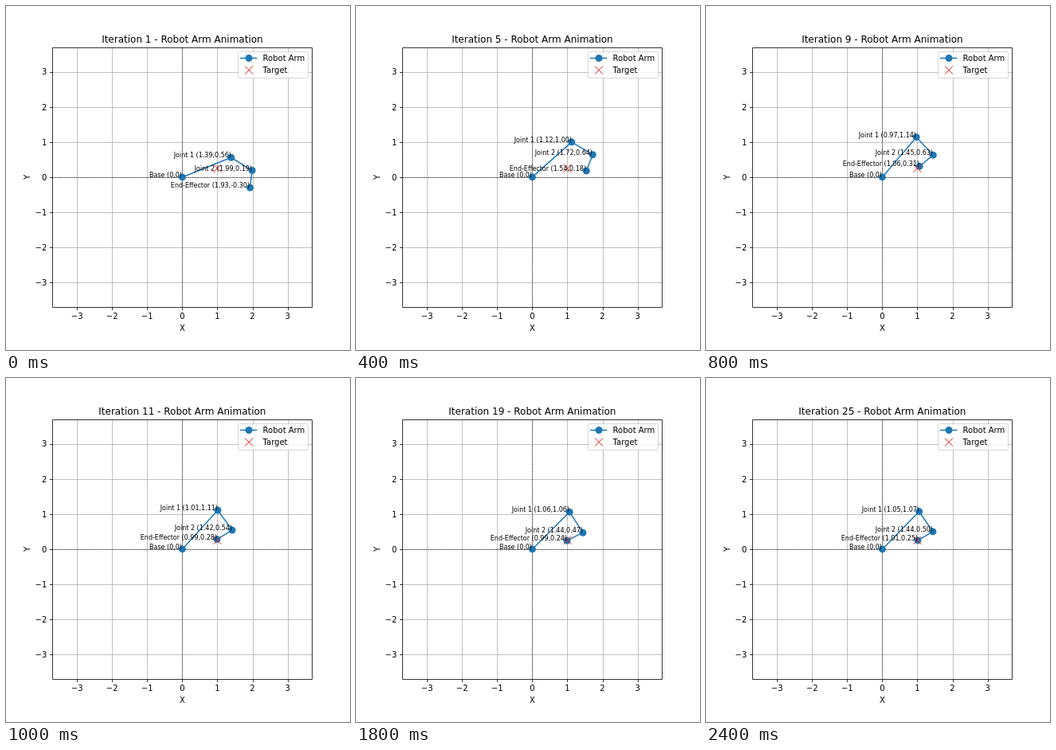
Recreate the animation shown at these times as an HTML page. Size 432 by 432 pixels, loop 2.5 s.

```html
<!DOCTYPE html>
<html lang="en">
<head>
<meta charset="utf-8">
<title>Robot Arm Animation</title>
<style>
  html, body { margin: 0; width: 100%; height: 100%; overflow: hidden; background: #fff; }
  svg { display: block; width: 432px; height: 432px; font: 10px "DejaVu Sans", sans-serif; }
</style>
</head>
<body>
<svg id="stage" viewBox="0 0 432 432"></svg>
<script>
const svg = document.getElementById('stage');
const STEP_MS = 100, STEPS = 25;
const CENTER = { x: 221.4, y: 214.92 }, UNIT = 44.076;
const BOX = { left: 58.5, top: 52.5, right: 384.5, bottom: 378.5 };
const BLUE = '#1f77b4', RED = '#dd1717';

// iteration, then x, y of joint 1, joint 2 and the end-effector
const POSES = [
  [1, 1.39, 0.56, 1.99, 0.19, 1.93, -0.30],
  [5, 1.12, 1.00, 1.72, 0.64, 1.54, 0.18],
  [9, 0.97, 1.14, 1.45, 0.63, 1.06, 0.31],
  [11, 1.01, 1.11, 1.42, 0.54, 0.99, 0.28],
  [15, 1.07, 1.05, 1.42, 0.45, 0.97, 0.23],
  [19, 1.06, 1.06, 1.44, 0.47, 0.99, 0.24],
  [25, 1.05, 1.07, 1.44, 0.50, 1.01, 0.25]
];

const toX = x => CENTER.x + x * UNIT;
const toY = y => CENTER.y - y * UNIT;
const snap = v => Math.round(v) + 0.5;

function add(tag, attrs, text) {
  const node = document.createElementNS('http://www.w3.org/2000/svg', tag);
  for (const key in attrs) node.setAttribute(key, attrs[key]);
  if (text !== undefined) node.textContent = text;
  return svg.appendChild(node);
}

const stroke = (d, color, width, extra) =>
  add('path', { d, fill: 'none', stroke: color, 'stroke-width': width, ...extra });
const label = (x, y, text, anchor = 'start', extra) =>
  add('text', { x, y, 'text-anchor': anchor, ...extra }, text);
const dot = (cx, cy) => add('circle', { cx, cy, r: 4.5, fill: BLUE });
const cross = (x, y) =>
  stroke(`M${x - 5} ${y - 5}l10 10M${x - 5} ${y + 5}l10 -10`, RED, 1);

const vLine = x => `M${x} ${BOX.top}V${BOX.bottom}`;
const hLine = y => `M${BOX.left} ${y}H${BOX.right}`;

// Grid, ticks and zero lines
for (let k = -3; k <= 3; k++) {
  const x = snap(toX(k)), y = snap(toY(k));
  const name = String(k).replace('-', '\u2212');
  stroke(vLine(x) + hLine(y), '#b0b0b0', 0.8);
  stroke(`M${x} ${BOX.bottom}v3.5M${BOX.left} ${y}h-3.5`, '#000', 0.8);
  label(toX(k), 393, name, 'middle');
  label(51.3, Math.round(toY(k) + 3.8), name, 'end');
}
stroke(hLine(snap(CENTER.y)) + vLine(snap(CENTER.x)), '#000', 0.5,
  { 'stroke-dasharray': '1.85 0.8' });

// Arm and target
const arm = stroke('', BLUE, 1.5, { 'stroke-linejoin': 'round', 'stroke-linecap': 'square' });
const dots = [0, 1, 2, 3].map(() => dot(CENTER.x, CENTER.y));
cross(toX(1), toY(0.25));

// Frame and captions
stroke(`M${BOX.left} ${BOX.top}H${BOX.right}V${BOX.bottom}H${BOX.left}Z`, '#000', 0.8);
const title = label(CENTER.x, 46, '', 'middle', { 'font-size': 12 });
label(CENTER.x, 407.5, 'X', 'middle');
label(0, 0, 'Y', 'middle', { transform: 'translate(29.5 215) rotate(-90)' });
const tags = dots.map(() => label(0, 0, '', 'end', { 'font-size': 8 }));

// Legend
add('rect', { x: 291.5, y: 57.5, width: 88, height: 33, rx: 2,
  fill: '#fff', stroke: '#ccc', opacity: 0.8 });
stroke('M294.6 65.5h20', BLUE, 1.5, { 'stroke-linecap': 'square' });
dot(305, 65.5);
cross(305, 80.5);
label(322.6, 69, 'Robot Arm');
label(322.6, 84, 'Target');

const slope = (i, c) =>
  (POSES[i + 1][c] - POSES[i][c]) / (POSES[i + 1][0] - POSES[i][0]);

function tangent(i, c) {
  const last = POSES.length - 1;
  if (i === 0) return 2 * slope(0, c) - tangent(1, c);
  if (i === last) return 2 * slope(last - 1, c) - tangent(last - 1, c);
  const before = POSES[i][0] - POSES[i - 1][0];
  const after = POSES[i + 1][0] - POSES[i][0];
  return (slope(i - 1, c) * after + slope(i, c) * before) / (before + after);
}

// Cubic Hermite curve through the poses
function coordinate(iteration, c) {
  let i = 0;
  while (i < POSES.length - 2 && iteration >= POSES[i + 1][0]) i++;
  const a = POSES[i], b = POSES[i + 1], span = b[0] - a[0];
  const s = (iteration - a[0]) / span, r = 1 - s;
  return a[c] * r * r * (1 + 2 * s) + b[c] * s * s * (3 - 2 * s)
    + span * s * r * (r * tangent(i, c) - s * tangent(i + 1, c));
}

function draw(iteration) {
  const points = [[0, 0]];
  for (let c = 1; c < 7; c += 2) {
    points.push([coordinate(iteration, c), coordinate(iteration, c + 1)]);
  }
  const names = ['Base', 'Joint 1', 'Joint 2', 'End-Effector'];
  points.forEach(([x, y], i) => {
    const px = toX(x), py = toY(y);
    const place = i ? `${x.toFixed(2)},${y.toFixed(2)}` : '0,0';
    dots[i].setAttribute('cx', px);
    dots[i].setAttribute('cy', py);
    tags[i].setAttribute('x', Math.round(px));
    tags[i].setAttribute('y', Math.round(py));
    tags[i].textContent = `${names[i]} (${place})`;
  });
  arm.setAttribute('d', 'M' + points.map(([x, y]) => `${toX(x)} ${toY(y)}`).join('L'));
  title.textContent = `Iteration ${iteration} - Robot Arm Animation`;
}

let start, shown;
function tick(now) {
  start ??= now;
  const iteration = Math.floor((now - start) / STEP_MS) % STEPS + 1;
  if (iteration !== shown) draw(shown = iteration);
  requestAnimationFrame(tick);
}
draw(shown = 1);
requestAnimationFrame(tick);
</script>
</body>
</html>
```
